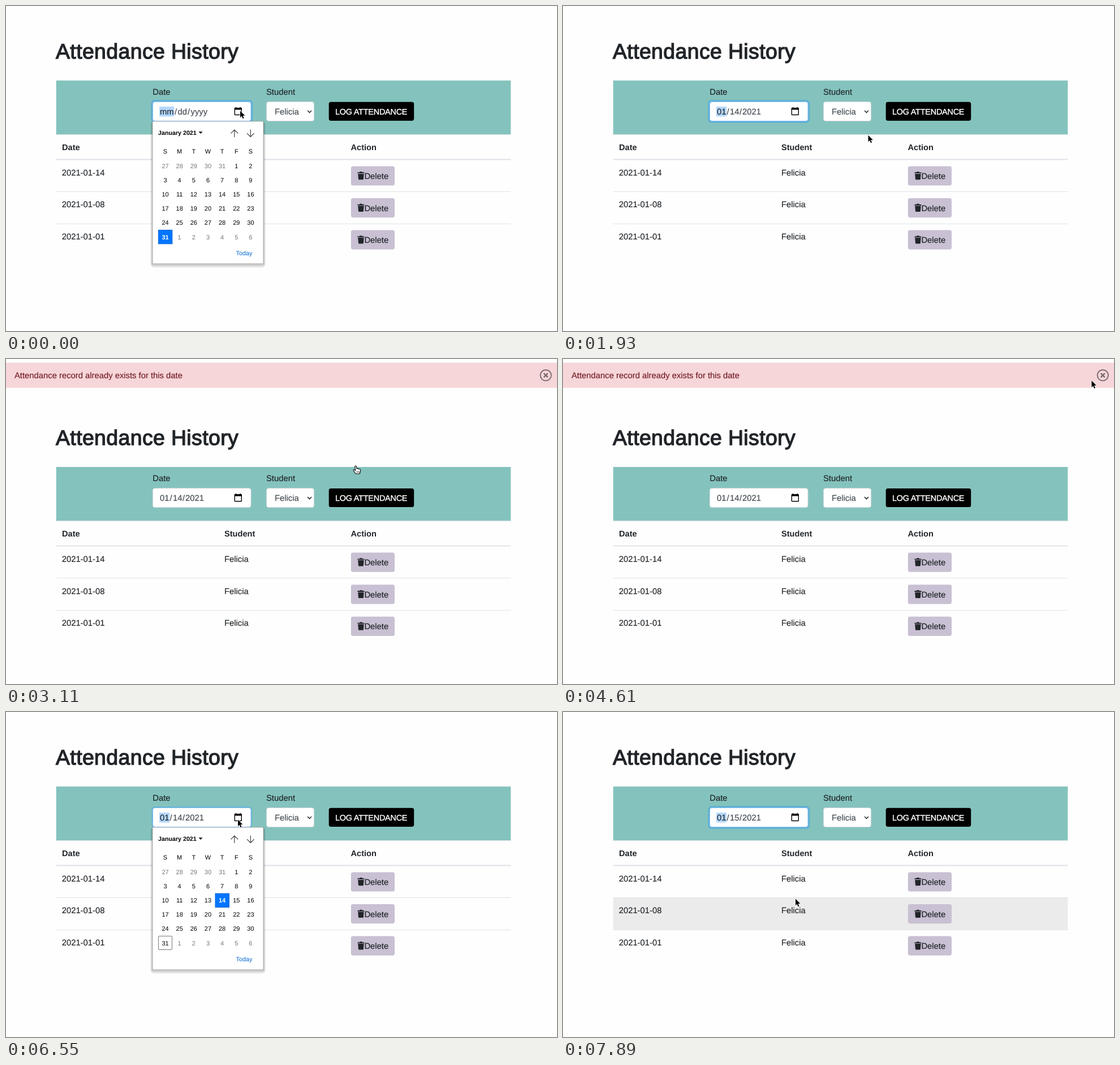
An HTML page that plays this animation: 974x575 px, repeating every 8000 ms.

```html
<!DOCTYPE html>
<html lang="en">
<head>
<meta charset="utf-8">
<title>Attendance History</title>
<style>
html, body { margin: 0; width: 100%; height: 100%; overflow: hidden; background: #fefefe; }
svg { display: block; width: 100%; height: 100%; }
text {
  font: 14.8px "Liberation Sans", Arial, sans-serif; fill: #212529; stroke: #212529; stroke-width: .15px;
  white-space: pre; text-rendering: geometricPrecision;
}
.title { font-size: 37.4px; letter-spacing: .4px; stroke-width: 1.3px; }
.bold { font-weight: bold; font-size: 14.6px; stroke: none; }
.input { fill: #41484e; stroke: #41484e; }
.log { font-size: 14.4px; letter-spacing: -.2px; fill: #fff; stroke: #fff; stroke-width: .4px; }
.alert { fill: #721c24; stroke: #721c24; }
.small { font-size: 10.8px; fill: #0069d2; stroke: none; }
.day { font-size: 11px; fill: #000; stroke: none; text-anchor: middle; }
.other { fill: #757575; }
.picked { fill: #fff; font-weight: bold; }
.month { font-size: 10.7px; font-weight: bold; fill: #000; stroke: none; }
</style>
</head>
<body>
<svg id="stage" viewBox="0 0 974 575"></svg>
<script>
const LOOP = 8000, TICK = 148.8, STUDENT = 'Felicia';
const stage = document.getElementById('stage');

const linear = u => u;
const smooth = u => u * u * (3 - 2 * u);
const easeOut = u => 1 - (1 - u) ** 2;

// Pointer stops: tick, x, y, easing on the way there
const stops = [
  [0, 414, 185, linear], [6, 385, 330, smooth], [11, 385, 330, linear],
  [13, 539.5, 228, linear], [17, 618, 189, easeOut], [25, 618, 189, linear],
  [32, 953, 29, smooth], [35, 953, 29, linear], [40, 424, 200, smooth],
  [42, 410, 190, easeOut], [46, 410, 190, linear], [51, 411, 330, smooth]
];

function pointerAt(k) {
  const i = stops.findIndex(s => s[0] >= k);
  if (i < 0) return stops[stops.length - 1].slice(1, 3);
  if (i === 0) return stops[0].slice(1, 3);
  const [k0, x0, y0] = stops[i - 1], [k1, x1, y1, ease] = stops[i];
  const p = ease((k - k0) / (k1 - k0));
  return [x0 + (x1 - x0) * p, y0 + (y1 - y0) * p];
}

const within = (k, from, to) => k >= from && k < to;

function stateAt(k) {
  const [x, y] = pointerAt(k);
  return {
    x, y,
    calendar: k < 8 || within(k, 44, 52),
    value: k < 8 ? ['mm', 'dd', 'yyyy'] : ['01', k < 52 ? '14' : '15', '2021'],
    picked: k < 8 ? 31 : 14,
    focus: k === 44 ? 0.5 : k < 19 || k > 44 ? 1 : 0,
    alert: within(k, 20, 34),
    hand: within(k, 15, 26) || within(k, 32, 34),
    overClose: within(k, 32, 34),
    row: within(k, 9, 12) || k > 52 ? 1 : k === 12 ? 0 : -1
  };
}

const text = (x, y, s, cls = '') => `<text x="${x}" y="${y}" class="${cls}">${s}</text>`;
const rect = (x, y, w, h, fill, rest = '') =>
  `<rect x="${x}" y="${y}" width="${w}" height="${h}" fill="${fill}" ${rest}/>`;
const line = (d, color, width = 1, rest = '') =>
  `<path d="${d}" fill="none" stroke="${color}" stroke-width="${width}" ${rest}/>`;

function dateField({ value, focus }) {
  const [m, d, y] = value, blank = m === 'mm';
  const xs = blank ? [272, 298, 303.5, 321, 326.5] : [272, 289.5, 295, 312, 317];
  let out = '';
  if (focus) {
    const r = 3 * focus;
    out += rect(259 - r, 169 - r, 174.5 + 2 * r, 35 + 2 * r, '#63b1d0', `rx="${4 + r}"`);
  }
  out += rect(259.5, 169.5, 173.5, 34, '#fff', `rx="3.7" stroke="${focus ? '#80bdff' : '#ced4da'}"`);
  if (focus) out += rect(271, 178, blank ? 26 : 18, 17.5, '#b3d7ff');
  [m, '/', d, '/', y].forEach((s, i) => {
    out += text(xs[i], 192, s, focus && !i ? '' : 'input');
  });
  return out + rect(404.3, 180.8, 12, 11.7, 'none', 'rx=".6" stroke="#000" stroke-width="1.4"') +
    rect(404, 180.3, 12.6, 3.2, '#000') + rect(405.8, 178.7, 1.4, 2, '#000') + rect(413.4, 178.7, 1.4, 2, '#000');
}

function form(state) {
  return rect(88.7, 131.8, 803.6, 95.2, '#84c3bd') +
    text(259.3, 157, 'Date') + text(460, 157, 'Student') + dateField(state) +
    rect(460.5, 169.5, 84, 34, '#fff', 'rx="3.7" stroke="#ced4da"') +
    text(475, 192, STUDENT, 'input') +
    line('M533 185l3.5 3.5l3.5-3.5', '#343a40', 1.7) +
    rect(570.7, 169.8, 150.5, 33.1, '#000', 'rx="3.7"') + text(582, 192, 'LOG ATTENDANCE', 'log');
}

function deleteButton(y) {
  return rect(609.8, y, 77.2, 34.2, '#c9c0d3', 'rx="3.7"') +
    `<path transform="translate(621 ${y + 9.5})" fill="#212529"
      d="M.4 1.4h3.4l.8-1.2h3.6l.8 1.2h3.4v1.8H.4zM1.2 4h10.4l-.7 9.2q-.1 1.2-1.2 1.2H3.1q-1.1 0-1.2-1.2z"/>` +
    text(633.4, y + 22.5, 'Delete');
}

function table({ row }) {
  let out = line('M88.7 227.5h803.6', '#dee2e6') +
    text(99, 255, 'Date', 'bold') + text(386, 255, 'Student', 'bold') + text(609.5, 255, 'Action', 'bold');
  ['14', '08', '01'].forEach((day, i) => {
    const y = 272 + i * 56.6;
    if (i === row) out += rect(88.7, y, 803.6, 56.6, '#ebebeb');
    if (i) out += line(`M88.7 ${Math.floor(y) + .5}h803.6`, '#dee2e6');
    out += text(98.7, y + 27.8, '2021-01-' + day) + text(386, y + 27.8, STUDENT) + deleteButton(y + 11.4);
  });
  return out + line('M88.7 271.5h803.6', '#dee2e6', 1.8);
}

function calendar({ x, y, picked }) {
  let out = rect(255.5, 204, 203, 258.5, '#000', 'rx="6" opacity=".1"') +
    rect(257, 204, 200, 255.5, '#000', 'rx="4" opacity=".1"') +
    rect(259, 204, 196, 252, '#fff', 'stroke="#999" stroke-width=".8"') +
    text(269, 228, 'January 2021', 'month') +
    '<path d="M340.5 222.3h7l-3.5 3.8z"/>' +
    line('M403.8 232v-13m-6.3 6.3l6.3-6.3l6.3 6.3M432.3 218.5v13m-6.3-6.3l6.3 6.3l6.3-6.3', '#333', 1.1) +
    text(406.5, 440.5, 'Today', 'small');
  [...'SMTWTFS'].forEach((s, i) => { out += text(281.5 + 25.15 * i, 261, s, 'day'); });
  for (let i = 0; i < 42; i++) {
    const n = i - 4, cx = 281.5 + 25.15 * (i % 7), cy = 283 + 25.1 * Math.floor(i / 7);
    const other = n < 1 || n > 31, label = n < 1 ? n + 31 : n > 31 ? n - 31 : n;
    const over = Math.abs(x - cx) < 12.5 && Math.abs(y - cy) < 12.5;
    if (n === picked) out += rect(cx - 12.1, cy - 12.1, 24.4, 24.4, '#0075ff', 'stroke="#0062d6"');
    else if (over) out += rect(cx - 12.5, cy - 12.5, 25, 25, '#efefef', 'rx="2"');
    if (n === 31 && n !== picked) out += rect(cx - 12, cy - 12, 24, 24, 'none', 'rx="1.5" stroke="#767676"');
    out += text(cx, cy + 4, label, 'day' + (n === picked ? ' picked' : other ? ' other' : ''));
  }
  return out;
}

function alertBar({ overClose }) {
  const color = overClose ? '#4a4143' : '#7b6c6e';
  return rect(0, 6.5, 974, 44.5, '#f6d6d9') +
    text(15, 34, 'Attendance record already exists for this date', 'alert') +
    `<circle cx="954.2" cy="28.8" r="9.6" fill="none" stroke="${color}" stroke-width="1.9"/>` +
    line('M950.7 25.3l7 7m0-7l-7 7', color, 2.5);
}

function pointer({ x, y, hand }) {
  const shape = hand
    ? `<path d="M-1.2 .7Q0-.6 1.2 .7L2 5Q3.3 4 4.3 5.3Q5.6 4.6 6.5 6Q8.4 5.6 8.7 7.4
        L8.3 10.6L7 14H.2L-3.6 8.7Q-4.4 7.2-3 6.8Q-1.8 6.7-.4 8.4z"
        fill="#fff" stroke="#000" stroke-width="1.1" stroke-linejoin="round"/>` +
      line('M2.2 9.5v2.6m2-2.6v2.6m2-2.6v2.6', '#000', .7)
    : `<path d="M0 .5V12.2L2.7 9.8L4.6 14.2L6.5 13.4L4.7 9H8.4z"
        fill="#000" stroke="#fff" stroke-width="1.4" paint-order="stroke" stroke-linejoin="round"/>`;
  return `<g transform="translate(${x} ${y})">${shape}</g>`;
}

function render(k) {
  const s = stateAt(k);
  stage.innerHTML = rect(0, 0, 974, 575, '#fefefe') + (s.alert ? alertBar(s) : '') +
    `<g transform="translate(0 ${s.alert ? 59.2 : 0})">` +
    text(88, 92.5, 'Attendance History', 'title') + form(s) + table(s) +
    (s.calendar ? calendar(s) : '') + '</g>' + pointer(s);
}

let shown = -1;
const start = performance.now();
function frame() {
  const t = (performance.now() - start) % LOOP;
  const k = Math.min(53, Math.floor((t + 16) / TICK));
  if (k !== shown) render(shown = k);
  requestAnimationFrame(frame);
}
frame();
</script>
</body>
</html>
```
